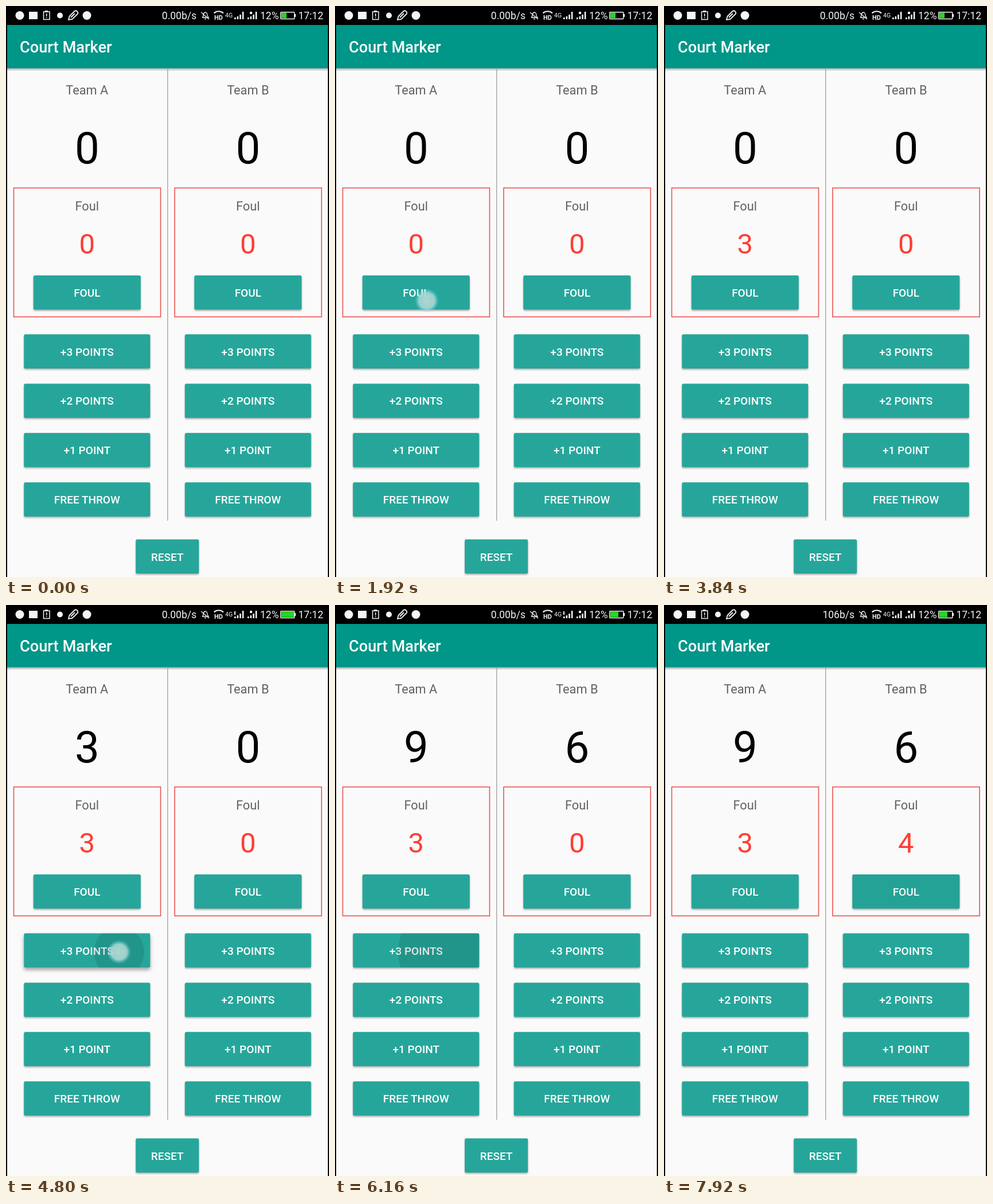
An HTML page for the animation above (8 s loop, 563x994 px).

```html
<!DOCTYPE html>
<html lang="en">
<head>
<meta charset="utf-8">
<title>Court Marker</title>
<style>
  html, body { margin: 0; width: 100%; height: 100%; overflow: hidden; background: #000; }
  svg { display: block; }
  text { font-family: Roboto, "Noto Sans", sans-serif; }
  .bar { font-size: 17.5px; fill: #f4f4f4; }
  .title { font-size: 27.2px; font-weight: 500; fill: #fff; }
  .label { font-size: 21.76px; fill: #616161; }
  .score { font-size: 76.2px; fill: #000; }
  .fouls { font-size: 49px; fill: #ff3d33; }
  .caption { font-size: 19.04px; font-weight: 500; fill: #fff; }
  .mid { text-anchor: middle; }
  .end { text-anchor: end; }
  .button { fill: #26a69a; filter: drop-shadow(0 2px 1.5px rgba(0, 0, 0, .32)); }
  .pressed { filter: drop-shadow(0 4px 3px rgba(0, 0, 0, .36)); }
  .line { fill: none; stroke: #f4f4f4; stroke-width: 1.5; }
</style>
</head>
<body>
<svg id="stage" width="563" height="994" viewBox="0 0 563 994">
  <defs>
    <radialGradient id="touch">
      <stop offset="0" stop-color="#b4d9d4" stop-opacity=".95"/>
      <stop offset=".66" stop-color="#a5d5cf" stop-opacity=".92"/>
      <stop offset=".74" stop-color="#9adbe0" stop-opacity=".6"/>
      <stop offset="1" stop-color="#7ccbd8" stop-opacity="0"/>
    </radialGradient>
    <linearGradient id="shade" x2="0" y2="1">
      <stop offset="0" stop-opacity=".3"/>
      <stop offset="1" stop-opacity="0"/>
    </linearGradient>
  </defs>
  <rect width="563" height="994"/>
  <rect x="2" y="33" width="559" height="961" fill="#fafafa"/>
  <rect x="2" y="33" width="559" height="75.5" fill="#009688"/>
  <rect x="2" y="108.5" width="559" height="5" fill="url(#shade)"/>
  <rect x="281" y="109" width="1.5" height="787" fill="#a9a9a9"/>
  <text class="title" x="24" y="81">Court Marker</text>

  <g fill="#f4f4f4">
    <circle cx="24" cy="16.5" r="7.5"/>
    <rect x="40" y="10" width="15" height="13"/>
    <circle cx="94" cy="16.5" r="5"/>
    <circle cx="141" cy="16.5" r="7.5"/>
    <path d="M68 8h5v3h-5zM70 13h1.5v5H70zM70 19.5h1.5V21H70z"/>
  </g>
  <g class="line">
    <path d="M65.5 10h10.500v13.500H65.500z"/>
    <path d="M109 24l1.500-6 9-9q3-2 5 1t-1 5l-8 8zM113 20l7-7" stroke-width="1.800"/>
    <path d="M342 20q2-1 2-5 1-4 4-4 3 1 3 6l2 3zM346 22.500h3M340 11l14 12" stroke-width="1.300"/>
    <path d="M363.500 13v-1.500q7-4.500 14.500 0V13" stroke-width="2.200"/>
  </g>
  <text class="bar" x="363" y="23.500" style="font-size:11px;font-weight:700">HD</text>
  <text class="bar" x="382" y="20" style="font-size:10.500px">4G</text>
  <g id="signal" fill="#f4f4f4"></g>
  <rect id="data" x="398" y="11" width="2" height="6" fill="#f4f4f4"/>
  <text id="speed" class="bar end" x="332" y="22.500"></text>
  <text class="bar" x="443" y="22.500">12%</text>
  <rect class="line" x="478.700" y="10.700" width="24" height="11.800" rx="1"/>
  <rect x="503" y="14" width="2" height="5" fill="#f4f4f4"/>
  <rect id="charge" x="480" y="12" height="9.200" fill="#22d822"/>
  <text class="bar end" x="553" y="22.500">17:12</text>

  <g id="board"></g>
  <g id="ripples"></g>
  <circle id="dot" r="21" fill="url(#touch)"/>
</svg>
<script>
const LOOP = 8000, STEP = 80;
const $ = id => document.getElementById(id);

function add(parent, tag, attrs, text) {
  const el = document.createElementNS("http://www.w3.org/2000/svg", tag);
  for (const key in attrs) el.setAttribute(key, attrs[key]);
  if (text) el.textContent = text;
  return parent.appendChild(el);
}

const board = $("board"), buttons = {}, readouts = {};

function label(cls, x, y, text) {
  return add(board, "text", { class: cls + " mid", x, y }, text);
}

function button(key, cx, y, width, text) {
  const box = { x: cx - width / 2, y, width, height: 59.5 };
  const el = add(board, "rect", { ...box, rx: 2.5, class: "button" });
  label("caption", cx, y + 37, text);
  buttons[key] = { box, el };
}

[["A", 141.3], ["B", 421.8]].forEach(([team, cx]) => {
  label("label", cx, 154, "Team " + team);
  readouts["score" + team] = label("score", cx, 273.5);
  add(board, "rect", { x: cx - 127.8, y: 316.7, width: 256, height: 224.5,
    fill: "none", stroke: "#ea5450", "stroke-width": 1.6 });
  label("label", cx, 356, "Foul");
  readouts["foul" + team] = label("fouls", cx, 431);
  button("foul" + team, cx, 469, 187, "FOUL");
  ["+3 POINTS", "+2 POINTS", "+1 POINT", "FREE THROW"].forEach((text, i) =>
    button((i ? "other" + i : "score") + team, cx, 571.5 + 85.9 * i, 220, text));
});
button("reset", 281.2, 928.5, 110, "RESET");

[398, 421].forEach(x => [3, 5, 8, 13].forEach((h, i) =>
  add($("signal"), "rect", { x: x + i * 4.6, y: 23 - h, width: 2.6, height: h })));
add($("signal"), "rect", { x: 425, y: 10, width: 4, height: 4 });

// down, up, button, x, y
const taps = [
  [1920, 2080, "foulA", 160, 513],
  [2800, 2960, "foulA", 160, 512],
  [3200, 3360, "foulA", 161, 511],
  [4080, 4240, "scoreA", 196, 606],
  [4720, 4880, "scoreA", 197, 604],
  [5120, 5280, "scoreB", 480, 602],
  [5600, 5760, "scoreB", 482, 600],
  [6000, 6160, "scoreA", 198, 603],
  [6560, 6720, "foulB", 466, 498],
  [6880, 7040, "foulB", 467, 496],
  [7200, 7360, "foulB", 467, 497],
  [7520, 7680, "foulB", 467, 497]
].map(([down, up, key, x, y]) => {
  const { box } = buttons[key];
  const clip = add($("ripples"), "svg", { ...box, overflow: "hidden" });
  const ripple = add(clip, "circle", { cx: x - box.x, cy: y - box.y, fill: "#000" });
  return { down, up, key, x, y, ripple };
});

// Battery ticks every 320 ms, slightly late in the second half
const levels = [9, 14, 18.5, 22, 2, 1];
function charge(t) {
  const lag = t < 3840 ? 0 : t < 5760 ? 160 : t < 6800 ? 120 : 80;
  return levels[(Math.floor((t - 80 - lag) / 320) + 1) % levels.length];
}

function draw(t) {
  const counts = { scoreA: 0, scoreB: 0, foulA: 0, foulB: 0 };
  const held = taps.find(p => t >= p.down && t < p.up);
  for (const p of taps) {
    if (t >= p.up) counts[p.key] += p.key.startsWith("score") ? 3 : 1;
    const grow = Math.min(1, Math.max(0, (t - p.down) / 400));
    const fade = Math.min(1, Math.max(0, 1 - (t - p.up) / 320));
    p.ripple.setAttribute("r", 220 * grow);
    p.ripple.setAttribute("opacity", .1 * fade);
  }
  for (const key in readouts) readouts[key].textContent = counts[key];
  for (const key in buttons)
    buttons[key].el.classList.toggle("pressed", !!held && held.key === key && t > held.down);

  $("dot").setAttribute("opacity", held ? 1 : 0);
  if (held) {
    $("dot").setAttribute("cx", held.x);
    $("dot").setAttribute("cy", held.y);
  }
  $("charge").setAttribute("width", charge(t));
  $("data").setAttribute("opacity", t < 4720 ? 0 : 1);
  $("speed").textContent = t < 6640 ? "0.00b/s" : "106b/s";
}

const start = performance.now();
function frame() {
  const t = (performance.now() - start) % LOOP;
  draw(Math.floor(t / STEP) * STEP);
  requestAnimationFrame(frame);
}
frame();
</script>
</body>
</html>
```
